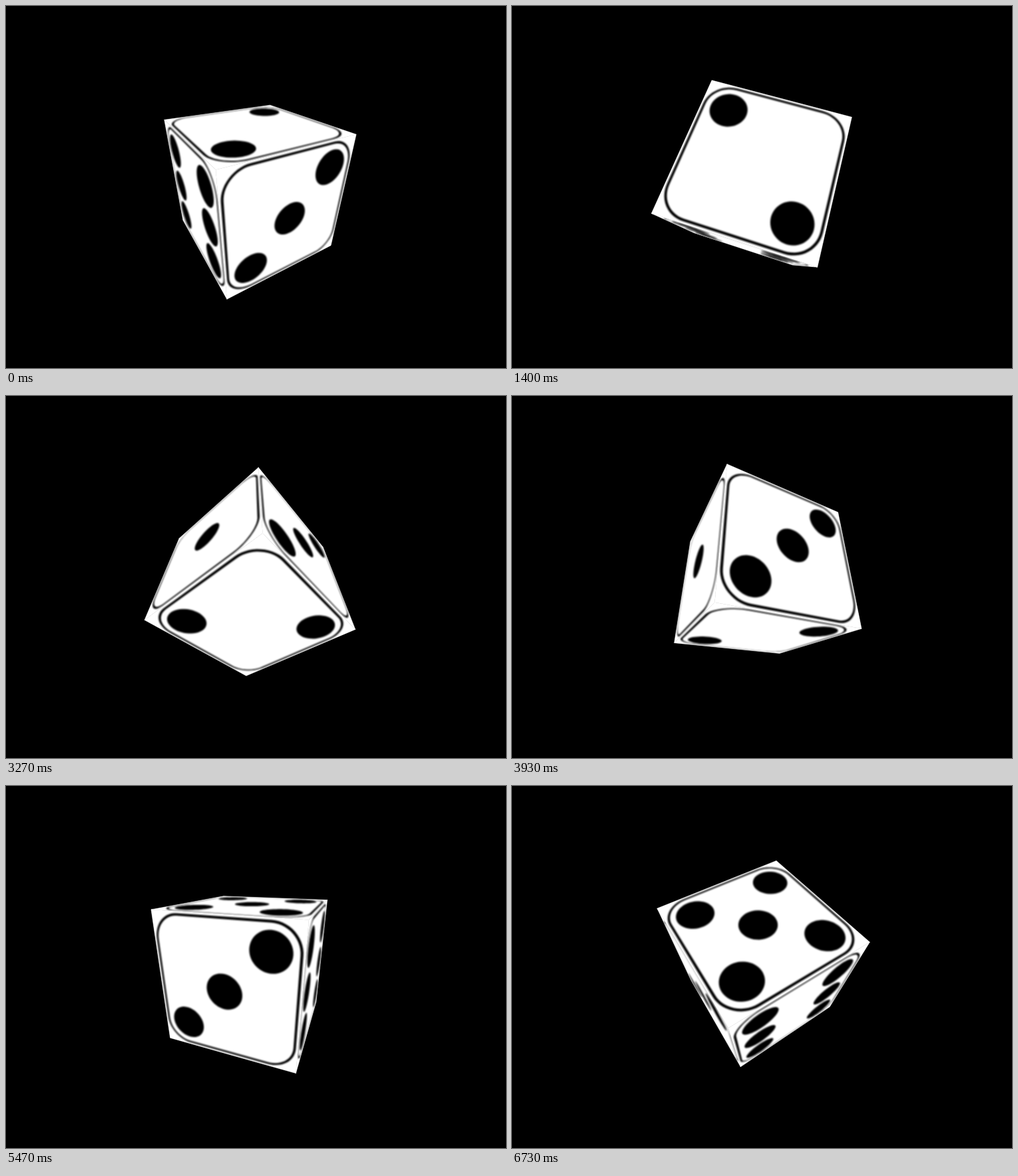
These frames come from a looping animation (751x545 px, 6790 ms). An HTML page with a canvas:

```html
<!DOCTYPE html>
<html lang="en">
<head>
<meta charset="utf-8">
<title>Rolling die</title>
<style>
  html, body { margin: 0; width: 100%; height: 100%; overflow: hidden; background: #000; }
  canvas { display: block; }
</style>
</head>
<body>
<canvas id="stage" width="751" height="545"></canvas>
<script>
const ctx = document.getElementById('stage').getContext('2d');

const LOOP = 6790;
const STEP = 200 / 3;
const CENTER = { x: 369.6, y: 271 };
const FOCAL = 364;
const DISTANCE = 4;
const PIP = 0.61;
const PIP_RADIUS = 0.257;

// Turn angle by step; the roll pauses for one step and slows near the end.
const TURN = [[0, 0.538], [14, 1.05], [15, 1.05], [39, 1.913], [82, 3.512], [101, 4.137]];

const diagonal = [[PIP, PIP], [-PIP, -PIP]];
const antiDiagonal = [[PIP, -PIP], [-PIP, PIP]];
const corners = [...diagonal, ...antiDiagonal];
const middle = [[0, 0]];

// n: normal axis, u and v: in-plane axes (0 = x, 1 = y, 2 = z).
const FACES = [
  { n: 0, sign: 1, u: 1, v: 2, pips: middle },
  { n: 1, sign: 1, u: 0, v: 2, pips: antiDiagonal },
  { n: 2, sign: 1, u: 0, v: 1, pips: [...middle, ...diagonal] },
  { n: 2, sign: -1, u: 0, v: 1, pips: corners },
  { n: 1, sign: -1, u: 0, v: 2, pips: [...middle, ...corners] },
  { n: 0, sign: -1, u: 1, v: 2, pips: [...corners, [0, PIP], [0, -PIP]] }
];

function stepAt(time) {
  const stamp = i => Math.round(i * 20 / 3) * 10;
  let i = Math.ceil(time / STEP);
  while (stamp(i) > time) i--;
  return Math.min(i, 101);
}

function angleAt(step) {
  const k = Math.max(1, TURN.findIndex(([s]) => s >= step));
  const [s0, a0] = TURN[k - 1];
  const [s1, a1] = TURN[k];
  return a0 + (a1 - a0) * (step - s0) / (s1 - s0);
}

// Columns of rotateX(a) * rotateY(a).
function axesAt(a) {
  const s = Math.sin(a), c = Math.cos(a);
  return [[c, s * s, -c * s], [0, c, s], [s, -s * c, c * c]];
}

// Maps face coordinates in -1..1 to the screen.
function projector(face, axes) {
  return ([p, q]) => {
    const [x, y, z] = [0, 1, 2].map(i =>
      face.sign * axes[face.n][i] + p * axes[face.u][i] + q * axes[face.v][i]);
    const k = FOCAL / (DISTANCE - z);
    return [CENTER.x + x * k, CENTER.y - y * k];
  };
}

function trace(path, points) {
  points.forEach(([x, y], i) => i ? path.lineTo(x, y) : path.moveTo(x, y));
  path.closePath();
}

function arc(cx, cy, r, from, to, count) {
  return Array.from({ length: count + 1 }, (_, i) => {
    const t = from + (to - from) * i / count;
    return [cx + r * Math.cos(t), cy + r * Math.sin(t)];
  });
}

function roundSquare(half, r) {
  const m = half - r, q = Math.PI / 2;
  return [[m, m], [-m, m], [-m, -m], [m, -m]]
    .flatMap(([x, y], i) => arc(x, y, r, i * q, (i + 1) * q, 14));
}

const SQUARE = [[1, 1], [-1, 1], [-1, -1], [1, -1]];
const BORDER = [roundSquare(0.975, 0.364), roundSquare(0.944, 0.333)];

function draw(time) {
  const axes = axesAt(angleAt(stepAt(time)));
  const visible = FACES
    .filter(f => f.sign * axes[f.n][2] * DISTANCE > 1)
    .map(f => {
      const project = projector(f, axes);
      const outline = new Path2D();
      const marks = new Path2D();
      trace(outline, SQUARE.map(project));
      BORDER.forEach(ring => trace(marks, ring.map(project)));
      f.pips.forEach(([x, y]) =>
        trace(marks, arc(x, y, PIP_RADIUS, 0, 2 * Math.PI, 48).map(project)));
      return { outline, marks };
    });

  ctx.fillStyle = '#000';
  ctx.fillRect(0, 0, 751, 545);
  ctx.fillStyle = ctx.strokeStyle = '#fff';
  ctx.lineWidth = 0.5;
  visible.forEach(({ outline }) => {
    ctx.fill(outline);
    ctx.stroke(outline);
  });

  ctx.fillStyle = '#000';
  visible.forEach(({ outline, marks }) => {
    ctx.save();
    ctx.clip(outline);
    ctx.filter = 'blur(1px)';
    ctx.fill(marks, 'evenodd');
    ctx.restore();
  });
}

const start = performance.now();
function tick() {
  draw((performance.now() - start) % LOOP);
  requestAnimationFrame(tick);
}
tick();
</script>
</body>
</html>
```
